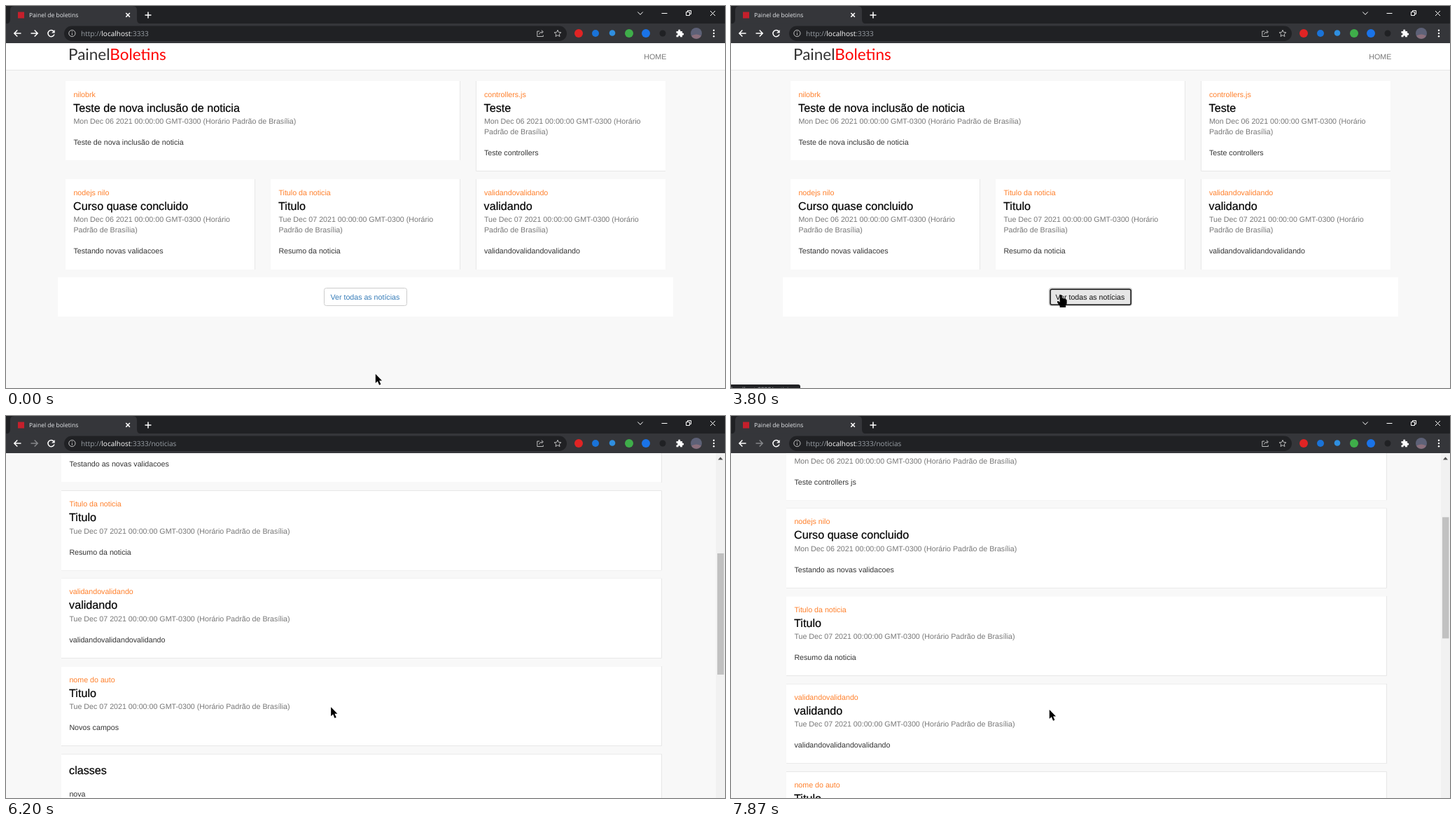
Animation, 1027 px wide and 545 px high, one loop 8000 ms. Source, as an HTML page:

```html
<!DOCTYPE html>
<html lang="pt-BR">
<head>
<meta charset="utf-8">
<title>Painel de boletins</title>
<style>
html, body { margin: 0; width: 100%; height: 100%; overflow: hidden; background: #f8f8f8 }
svg { display: block; width: 1027px; height: 545px }
text { font-family: "Liberation Sans", Arial, sans-serif; text-rendering: geometricPrecision; white-space: pre }
.ui text { font-family: "Open Sans", "Noto Sans", sans-serif }
.logo { font-family: Lato, sans-serif }
.head { stroke: #000; stroke-width: .2 }
.card { fill: #fff; filter: drop-shadow(.8px .8px .5px #0005) }
.line { fill: none; stroke: #fff; stroke-width: 1.5 }
.thin { stroke-width: 1 }
</style>
</head>
<body>
<svg viewBox="0 0 1027 545">
  <g id="home"></g>
  <g id="list"></g>
  <g id="bar">
    <path d="M1014 53h13v492h-13z" fill="#f1f1f1"/>
    <path id="up" d="M1017 62.5l3.5-4 3.5 4z"/>
    <rect id="thumb" x="1016" y="67" width="9.5" height="173" fill="#c1c1c1"/>
  </g>
  <g id="status" class="ui">
    <rect x="-4" y="540" width="103" height="20" rx="3" fill="#202124"/>
    <text x="0" y="549.5" fill="#bdc1c6" style="font-size:8.5px">localhost:3333/noticias</text>
  </g>
  <g id="chrome" class="ui"></g>
  <path id="arrow" d="M-.2 0V13L2.8 10.3 5.1 15.8 7.4 14.8 5.1 9.5H9Z"/>
  <path id="hand" d="M-1.6 1Q0-1.2 1.5 1V5Q3 4.3 4.2 5.4 5.8 5 6.6 6.3 8.4 6.2 8.4 8.2V12.5L6.8 15.5V18H-1.6V16L-5 11.3Q-6 9.3-4.5 9-3 8.8-1.6 10.8Z"/>
</svg>
<script>
const $ = id => document.getElementById(id);
const show = (id, on) => $(id).style.display = on ? '' : 'none';
const set = (id, name, value) => $(id).setAttribute(name, value);
const text = (x, y, s, fill, size = 10.68, extra = '') =>
  `<text x="${x}" y="${y}" fill="${fill}" style="font-size:${size}px" ${extra}>${s}</text>`;
const rect = (x, y, w, h, fill, extra = '') =>
  `<rect x="${x}" y="${y}" width="${w}" height="${h}" fill="${fill}" ${extra}/>`;
const dot = (x, y, r, fill) => `<circle cx="${x}" cy="${y}" r="${r}" fill="${fill}"/>`;
const line = (d, extra = '') => `<path class="line" d="${d}" ${extra}/>`;
const thin = d => `<path class="line thin" d="${d}"/>`;

const date = day => [`${day} 2021 00:00:00 GMT-0300 (Horário`, 'Padrão de Brasília)'];
const mon = date('Mon Dec 06'), tue = date('Tue Dec 07');

const header = dx => rect(0, 53, 1027, 38, '#fff') + rect(0, 91, 1027, 1, '#e7e7e7') +
  text(89 + dx, 77, 'Painel<tspan fill="#f00">Boletins</tspan>', '#333', 22.5, 'class="logo"') +
  text(911.3 + dx, 76, 'HOME', '#777');

function card(x, y, w, h, title, body, author, day, wrap) {
  const head = dy => text(x - .3, y + dy, title, '#000', 16.15, 'class="head"');
  let out = `<rect class="card" x="${x}" y="${y}" width="${w}" height="${h}"/>`;
  x += 11.4;
  if (!author) return out + head(28.5) + text(x, y + 61, body, '#333');
  out += text(x, y + 22.5, author, '#ff7f2a') + head(43.5);
  out += wrap ? text(x, y + 61, day[0], '#777') + text(x, y + 76, day[1], '#777')
              : text(x, y + 61, day.join(' '), '#777');
  return out + text(x, y + (wrap ? 106 : 91), body, '#333');
}

$('home').innerHTML = header(0) +
  card(85, 107, 563.5, 113, 'Teste de nova inclusão de noticia', 'Teste de nova inclusão de noticia', 'nilobrk', mon) +
  card(671.5, 107, 270.5, 128.5, 'Teste', 'Teste controllers', 'controllers.js', mon, true) +
  card(85, 247, 270.5, 129, 'Curso quase concluido', 'Testando novas validacoes', 'nodejs nilo', mon, true) +
  card(378, 247, 270.5, 129, 'Titulo', 'Resumo da noticia', 'Titulo da noticia', tue, true) +
  card(671.5, 247, 270.5, 129, 'validando', 'validandovalidandovalidando', 'validandovalidando', tue, true) +
  rect(74, 387, 879, 56, '#fff') +
  rect(454.5, 402.5, 118, 25, '#fff', 'id="btn" rx="3" stroke="#ccc"') +
  `<g id="ring">${rect(455.4, 403.4, 116.4, 23.6, 'none', 'rx="2.5" stroke="#fff" stroke-width=".8"')}
   ${rect(456.2, 404.2, 114.9, 22.1, 'none', 'rx="2" stroke="#101010" stroke-width="1.5"')}</g>` +
  text(463.5, 418.7, 'Ver todas as notícias', '#337ab7', 10.65, 'id="link"');

const news = [
  ['Teste de nova inclusão de noticia', 'Teste de nova inclusão de noticia form', 'nilobrk', mon],
  ['Teste', 'Teste controllers js', 'controllers.js', mon],
  ['Curso quase concluido', 'Testando as novas validacoes', 'nodejs nilo', mon],
  ['Titulo', 'Resumo da noticia', 'Titulo da noticia', tue],
  ['validando', 'validandovalidandovalidando', 'validandovalidando', tue],
  ['Titulo', 'Novos campos', 'nome do auto', tue],
  ['classes', 'nova'],
  ['Outra nova noticia a noite', 'noite'],
  ['Nova noticia', 'teste']
];
let cardTop = 107;
$('list').innerHTML = header(-6) + news.map(n => {
  const h = n[2] ? 113.4 : 83.4, out = card(79, cardTop, 857.5, h, ...n);
  cardTop += h + 11.8;
  return out;
}).join('');

$('chrome').innerHTML =
  rect(0, 0, 1027, 25.5, '#202124') + rect(0, 25, 1027, 28, '#35363a') +
  '<path d="M0 25.5Q6 25 6 19V6Q6 0 12 0H181Q187 0 187 6V19Q187 25 193 25.5Z" fill="#35363a"/>' +
  rect(17, 8.5, 9, 9, '#c4202c', 'id="icon"') +
  line('M26 13A4.2 4.2 0 0 0 18.5 10.2', 'id="spin" style="stroke:#6d7fc0"') +
  text(33, 16, '', '#e8eaed', 8.5, 'id="tab"') +
  line('M171.3 10l5.6 5.6M176.9 10l-5.6 5.6') +
  line('M203 8.5v9M198.5 13h9') +
  thin('M902.3 8.5l3.7 3.8 3.7-3.8') +
  thin('M936.5 10.5h8M971.5 8.5h5v5h-5zM973.5 8.5v-2h5v5h-2M1006 7l7 7M1013 7l-7 7') +
  line('M21.5 39h-9.5M16.3 34.5L11.8 39l4.5 4.5') +
  line('M35.5 39h9.5M40.7 34.5l4.5 4.5-4.5 4.5', 'id="fwd"') +
  `<g id="reload">${line('M68.3 36.3A4.6 4.6 0 1 0 69 40.4')}<path d="M69.7 34v4.6h-4.6z" fill="#fff"/></g>` +
  line('M60.5 35.2l7.6 7.6M68.1 35.2l-7.6 7.6', 'id="stop"') +
  rect(83, 28.5, 718, 21.5, '#202124', 'rx="10.75"') +
  '<g opacity=".7">' +
  thin('M99 39a4.6 4.6 0 1 0-9.2 0 4.6 4.6 0 1 0 9.2 0M94.4 38.5v3.2M94.4 36v1.2') +
  thin('M762 36h-3.2v7.5h8.5v-2M761.5 40.5q.5-3.6 5-3.6M764.8 34.6l2.6 2.3-2.6 2.4') +
  thin('M788 34.3l1.4 3.2 3.5.3-2.7 2.3.8 3.4-3-1.8-3 1.8.8-3.4-2.7-2.3 3.5-.3z') + '</g>' +
  text(107, 42.7, 'http://<tspan fill="#fff">localhost</tspan>:3333<tspan id="path">/noticias</tspan>', '#9aa0a6', 10) +
  dot(818, 39, 6, '#e02424') + dot(842, 39, 5, '#1a73d8') + dot(866, 38.5, 4.3, '#2f8fe0') +
  dot(890, 39, 6, '#3fae4a') + dot(914, 39, 6, '#1a73e8') + dot(938, 39, 4.5, '#202124') +
  '<path d="M957.5 36h2.8q-.6-2.4 1.4-2.4t1.4 2.4h2.9v2.7q2.2-.6 2.2 1.4t-2.2 1.4v2.8h-3q.5-2-1.3-2t-1.3 2h-2.9v-3q2 .5 2-1.2t-2-1.3z" fill="#fff"/>' +
  dot(986, 39, 8, '#5d6177') + '<path d="M979 42.5q7-4 14 0a8 8 0 0 1-14 0z" fill="#8b6f7c"/>' +
  [34.8, 39, 43.2].map(y => dot(1011, y, 1.2, '#fff')).join('');

// pointer tip: time, x, y
const track = [
  [0, 528, 525], [70, 529, 526], [200, 532, 530], [620, 532, 530], [1000, 547, 496], [1470, 530, 446],
  [1800, 528, 430], [2070, 527, 422], [2900, 527, 422], [2930, 526.7, 422], [3500, 463, 422],
  [3730, 468, 412], [4100, 485, 412], [4600, 485, 412], [4730, 480, 414], [4870, 475, 414],
  [5500, 468, 413], [5850, 468, 413], [6330, 463, 416], [6700, 461, 417], [6870, 461, 417],
  [7000, 455, 419], [8000, 455, 419]
];
// wheel notches: time, position
const wheel = [
  [0, 0], [5870, 1], [5930, 2], [6000, 3], [6130, 4], [6200, 5], [6330, 6],
  [6730, 5], [6800, 4], [6870, 3], [7000, 4], [7130, 5],
  [7270, 6], [7330, 7], [7600, 6], [7670, 5], [7770, 4], [7870, 3]
];
const notch = 75.18, onList = 4870, clickAt = 4130;

function pointer(t) {
  const i = track.findIndex(k => k[0] > t), a = track[i - 1], b = track[i];
  const u = (t - a[0]) / (b[0] - a[0]);
  return [a[1] + (b[1] - a[1]) * u, a[2] + (b[2] - a[2]) * u];
}

function draw(t) {
  const [x, y] = pointer(t), list = t >= onList, loading = t >= 4200 && !list;
  const over = !list && y < 428, onLink = over && y < 420 && x > 463;
  const pressed = t >= 2400 && t < 2530;

  show('home', !list); show('list', list); show('bar', list);
  const scroll = wheel.filter(w => w[0] <= t).pop()[1] * notch;
  set('list', 'transform', `translate(0 ${-scroll})`);
  set('thumb', 'y', 67 + scroll * .343);
  set('up', 'fill', scroll ? '#505050' : '#a3a3a3');

  set('btn', 'fill', pressed ? '#d4d4d4' : over ? '#e6e6e6' : '#fff');
  set('btn', 'stroke', over ? '#adadad' : '#ccc');
  set('link', 'fill', onLink ? '#111' : '#337ab7');
  show('ring', t >= 2400 && t < clickAt);
  show('status', t >= 3800 && !list);

  show('icon', !loading); show('spin', loading);
  set('spin', 'transform', `rotate(${-t * .4 % 360} 22 13)`);
  show('reload', !loading); show('stop', loading);
  show('path', loading || list);
  $('fwd').style.stroke = loading || list ? '#85878a' : '#fff';
  $('tab').textContent = loading ? 'localhost:3333/noticias' : 'Painel de boletins';

  show('hand', over); show('arrow', !over);
  set(over ? 'hand' : 'arrow', 'transform', `translate(${x} ${y})`);
}

function tick() {
  draw(performance.now() % 8000);
  requestAnimationFrame(tick);
}
tick();
</script>
</body>
</html>
```
